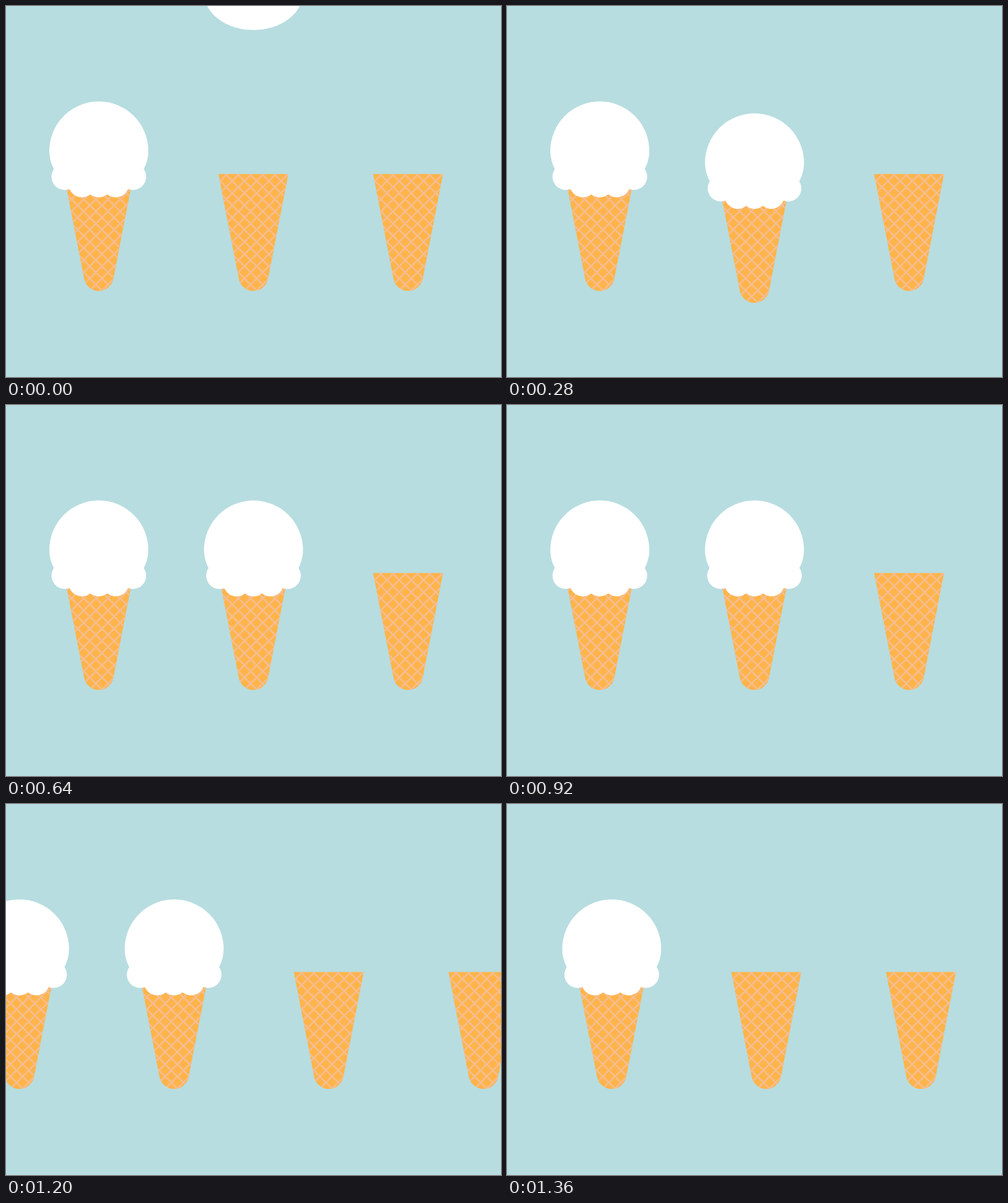
Animation, 800 px wide and 600 px high, one loop 1.4 s. Source, as an HTML page:

```html
<!DOCTYPE html>
<html lang="en">
<head>
<meta charset="utf-8">
<title>Ice cream line</title>
<style>
  html, body { margin: 0; width: 100%; height: 100%; overflow: hidden; background: #b7dde0; }
  svg { display: block; width: 100vw; height: 100vh; }
</style>
</head>
<body>
<svg viewBox="0 0 800 600">
  <defs>
    <path id="shell" d="M-56.7 271.8H56.3L23.5 441.2A24 24 0 0 1-23.7 441.2Z"/>
    <clipPath id="cut"><use href="#shell"/></clipPath>
    <g id="cone">
      <use href="#shell" fill="#ffb44a"/>
      <path id="waffle" clip-path="url(#cut)" fill="none" stroke="#f5bd92" stroke-width="2.6"/>
    </g>
    <g id="lumps">
      <circle cx="-55" cy="276" r="21.5"/>
      <circle cx="-27.3" cy="288" r="21.5"/>
      <circle cy="288" r="21.5"/>
      <circle cx="27.3" cy="288" r="21.5"/>
      <circle cx="55" cy="276" r="21.5"/>
    </g>
  </defs>
  <g id="belt">
    <g transform="translate(150)">
      <use href="#cone"/>
      <g fill="#fff">
        <path d="M-80 234.3A80 80 0 0 1 80 234.3A80 70 0 0 1-80 234.3Z"/>
        <use href="#lumps"/>
      </g>
    </g>
    <g transform="translate(400)">
      <use id="target" href="#cone"/>
      <g id="scoop" fill="#fff">
        <path id="ball"/>
        <use id="drips" href="#lumps"/>
      </g>
    </g>
    <use href="#cone" x="650"/>
    <use href="#cone" x="900"/>
  </g>
</svg>
<script>
  const $ = id => document.getElementById(id);
  const LOOP = 1400, STEP = 40;
  const SPEED = 1.047, LAND = 244, TOUCH = 220;
  const SLIDE = 1000, SLIDE_TIME = 390, GAP = 250;

  const clamp = v => Math.max(0, Math.min(1, v));
  const move = (id, x, y) => $(id).setAttribute('transform', `translate(${x} ${y})`);

  function drawWaffle() {
    const pitch = 19.7, x0 = 5.15, y0 = 283;
    let d = '';
    for (let i = -8; i < 18; i++) {
      const y = y0 + i * pitch;
      d += `M${x0 - 80} ${y - 80}l160 160M${x0 - 80} ${y + 80}l160-160`;
    }
    $('waffle').setAttribute('d', d);
  }

  // Damped spring that starts with the speed of the fall
  function bounce(t) {
    const w = 0.0172, decay = 0.0168;
    return t < 0 ? 0 : SPEED / w * Math.exp(-decay * t) * Math.sin(w * t);
  }

  function render(t) {
    const dip = bounce(t - LAND);
    const fall = Math.min(0, (t - LAND) * SPEED);
    const p = clamp((t - TOUCH) / 70);
    const spread = 1 - (1 - p) ** 2;
    const size = 0.5 + 0.5 * spread;

    move('target', 0, dip);
    move('scoop', 0, fall + dip);
    $('ball').setAttribute('d',
      `M-80 234.3A80 80 0 0 1 80 234.3A80 ${60 + 10 * spread} 0 0 1-80 234.3Z`);
    $('drips').setAttribute('transform', `translate(0 ${240 * (1 - size)}) scale(${size})`);
    move('belt', -GAP * clamp((t - SLIDE) / SLIDE_TIME), 0);
  }

  const start = performance.now();
  function tick() {
    const t = (performance.now() - start + 2) % LOOP;
    render(Math.floor(t / STEP) * STEP);
    requestAnimationFrame(tick);
  }

  drawWaffle();
  tick();
</script>
</body>
</html>
```
